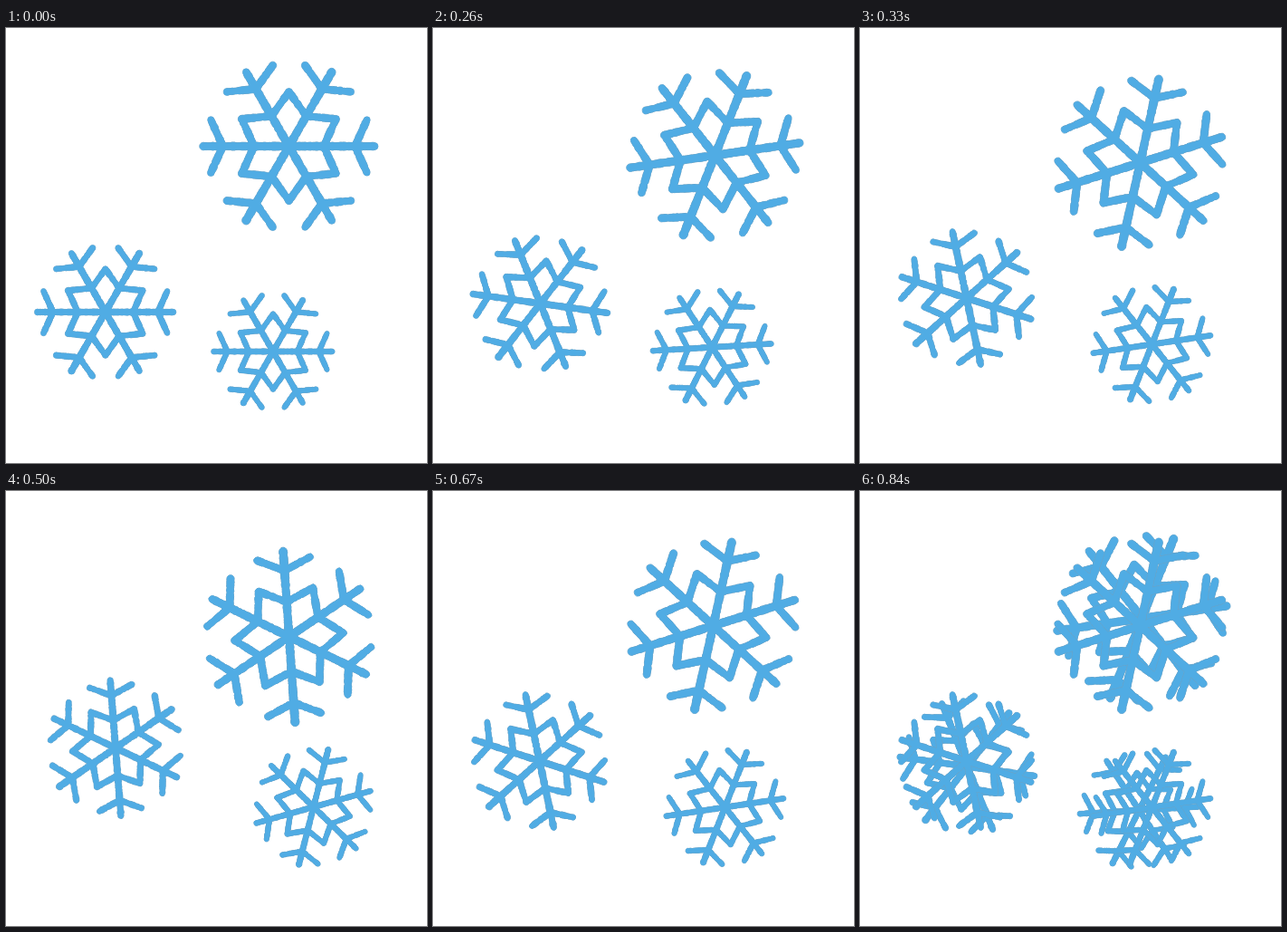
An HTML page with a canvas that plays this animation: 465x480 px, repeating every 1 s.

```html
<!DOCTYPE html>
<html lang="en">
<head>
<meta charset="utf-8">
<title>Snowflakes</title>
<style>
  html, body { margin: 0; width: 100%; height: 100%; overflow: hidden; background: #fff; }
  canvas { display: block; }
</style>
</head>
<body>
<canvas id="stage" width="465" height="480"></canvas>
<script>
const ctx = document.getElementById('stage').getContext('2d');
const LOOP = 1000;
const STEP = 170;

// Key poses as [x, y, degrees].
const flakes = [
  { scale: 1, poses: [[312.5, 130.5, 0], [311.5, 140.5, -8.3], [309.5, 148.7, -17.5], [312.7, 160.8, -34]] },
  { scale: 0.793, poses: [[109.8, 313.5, 0], [118.5, 304, 8], [117.7, 298, 18], [121, 283.5, 25.5]] },
  { scale: 0.692, poses: [[295, 357, 0], [308.3, 352.3, -3.4], [322.5, 349, -8.5], [339.7, 348.7, -15.7]] }
];

// Poses visible in each step; the last step shows two at once.
const sequence = [[0], [1], [2], [3], [2], [1, 2]];

let seed = 7;
function random() {
  seed = (seed * 16807) % 2147483647;
  return seed / 2147483647;
}

function polar(radius, degrees) {
  const a = degrees * Math.PI / 180;
  return [radius * Math.cos(a), radius * Math.sin(a)];
}

// A crayon-like stroke: overlapping dots with a slightly uneven radius.
function addStroke(path, [x1, y1], [x2, y2], width) {
  const steps = Math.ceil(Math.hypot(x2 - x1, y2 - y1) / 1.5);
  for (let i = 0; i <= steps; i++) {
    const t = i / steps;
    const x = x1 + (x2 - x1) * t;
    const y = y1 + (y2 - y1) * t;
    const r = width / 2 + (random() - 0.5) * 0.9;
    path.moveTo(x + r, y);
    path.arc(x, y, r, 0, Math.PI * 2);
  }
}

// Six forked arms around a six-pointed star.
function makeFlake() {
  const path = new Path2D();
  for (let angle = 0; angle < 360; angle += 60) {
    const fork = polar(73, angle);
    const notch = polar(38.5, angle);
    addStroke(path, [0, 0], polar(94.5, angle), 8.4);
    for (const side of [-1, 1]) {
      addStroke(path, fork, polar(91, angle + 18.7 * side), 7.6);
      addStroke(path, notch, polar(60, angle + 30 * side), 7.6);
    }
  }
  return path;
}

const shape = makeFlake();

function drawFlake(scale, [x, y, degrees]) {
  ctx.save();
  ctx.translate(x, y);
  ctx.rotate(degrees * Math.PI / 180);
  ctx.scale(scale, scale);
  ctx.lineWidth = 0.9 / scale;
  ctx.stroke(shape);
  ctx.fill(shape);
  ctx.restore();
}

function render() {
  const time = performance.now() % LOOP;
  const step = Math.floor((time + 10) / STEP);
  ctx.fillStyle = '#fff';
  ctx.fillRect(0, 0, 465, 480);
  ctx.fillStyle = '#50ace4';
  ctx.strokeStyle = '#6ba3c6';
  for (const pose of sequence[step]) {
    for (const flake of flakes) drawFlake(flake.scale, flake.poses[pose]);
  }
  requestAnimationFrame(render);
}
render();
</script>
</body>
</html>
```
